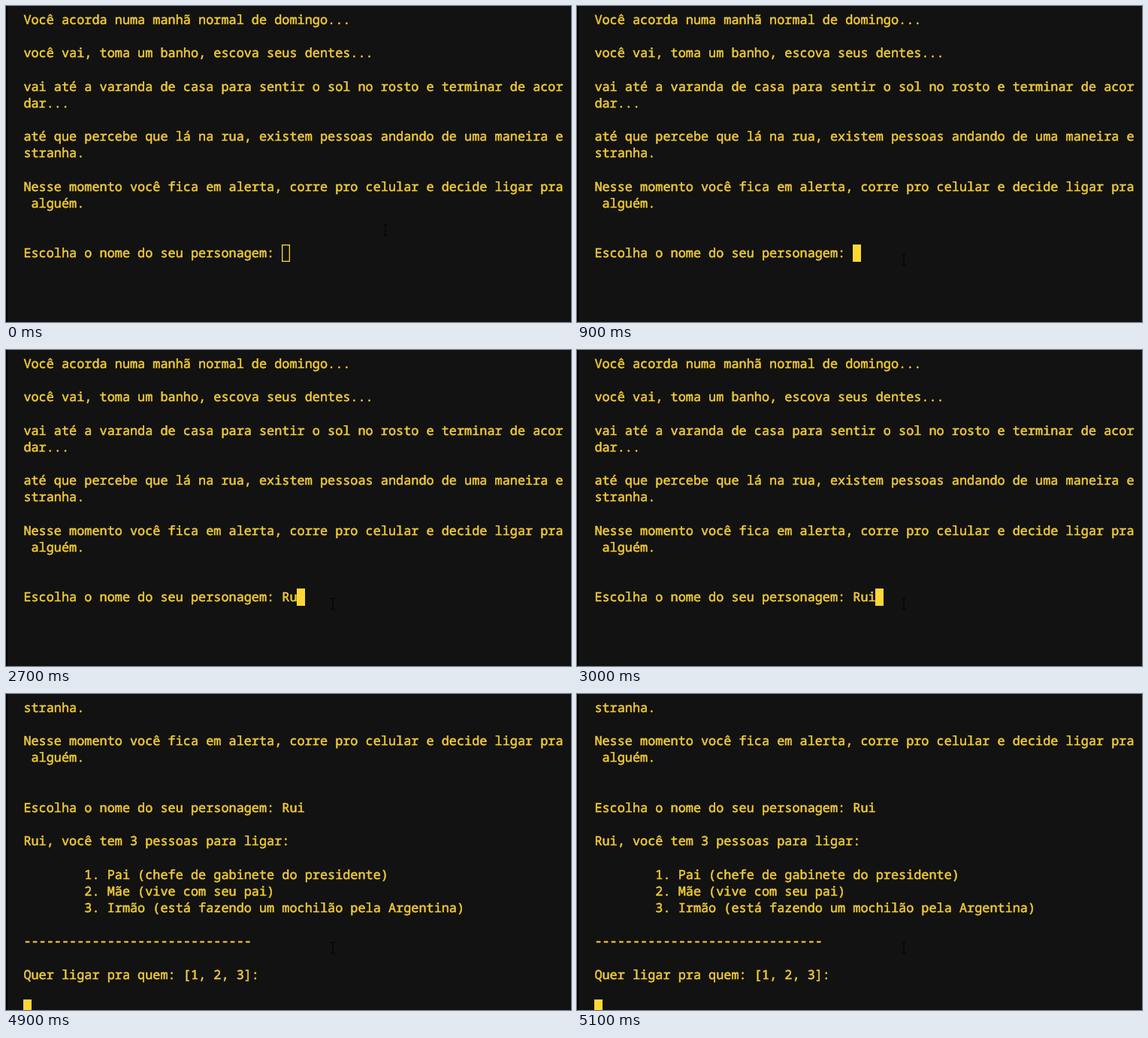
Recreate the animation shown at these times as an HTML page. Size 752 by 420 pixels, loop 8000 ms.

```html
<!DOCTYPE html>
<html lang="pt-BR">
<head>
<meta charset="utf-8">
<title>Terminal</title>
<style>
  html, body { margin: 0; width: 100%; height: 100%; overflow: hidden; background: #121212; }
  svg { display: block; width: 752px; height: 420px; }
  text {
    font: 500 16.87px "Noto Sans Mono", "DejaVu Sans Mono", monospace;
    fill: #efca36;
    stroke: #efca36;
    stroke-width: 0.55px;
    white-space: pre;
    text-rendering: geometricPrecision;
  }
</style>
</head>
<body>
<svg id="stage" viewBox="0 0 752 420">
  <rect width="752" height="420" fill="#121212"/>
  <rect width="2" height="420" fill="#030303"/>
  <g id="lines"></g>
  <rect id="caret" stroke="#fdd835"/>
  <path id="mouse" d="M-3 -7.5H-1L0 -6.5L1 -7.5H3M0 -6.5V6.5M-3 7.5H-1L0 6.5L1 7.5H3" fill="none" stroke="#000"/>
</svg>
<script>
const LOOP = 8000, LEFT = 23.4, BASE = 23.8, COL = 10.12, ROW = 22.18;
const NAME = 'Rui';
const PROMPT = 'Escolha o nome do seu personagem: ';
const $ = id => document.getElementById(id);

const ALERT = [
  'stranha.',
  '',
  'Nesse momento você fica em alerta, corre pro celular e decide ligar pra',
  ' alguém.',
  '', ''
];
const INTRO = [
  'Você acorda numa manhã normal de domingo...',
  '',
  'você vai, toma um banho, escova seus dentes...',
  '',
  'vai até a varanda de casa para sentir o sol no rosto e terminar de acor',
  'dar...',
  '',
  'até que percebe que lá na rua, existem pessoas andando de uma maneira e',
  ...ALERT
];
const MENU = [
  ...ALERT,
  PROMPT + NAME,
  '',
  NAME + ', você tem 3 pessoas para ligar:',
  '',
  '        1. Pai (chefe de gabinete do presidente)',
  '        2. Mãe (vive com seu pai)',
  '        3. Irmão (está fazendo um mochilão pela Argentina)',
  '',
  '-'.repeat(30),
  '',
  'Quer ligar pra quem: [1, 2, 3]:',
  '',
  ''
];

const FOCUS = 800, ENTER = 4900;
const KEYS = [2400, 2600, 2800];
const MOUSE = [[0, 505, 297.5], [400, 480, 312], [500, 445, 331], [600, 435, 337.5]];

const rows = MENU.map((_, i) => {
  const row = document.createElementNS('http://www.w3.org/2000/svg', 'text');
  row.setAttribute('x', LEFT);
  row.setAttribute('y', BASE + i * ROW);
  $('lines').append(row);
  return row;
});

function set(el, attrs) {
  for (const key in attrs) el.setAttribute(key, attrs[key]);
}

function drawCaret(col, row, solid) {
  const inset = solid ? 0 : 0.65;
  set($('caret'), {
    x: Math.round(LEFT - 0.4 + col * COL) + inset,
    y: Math.round(6.7 + row * ROW) + inset,
    width: 11 - 2 * inset,
    height: 23 - 2 * inset,
    fill: solid ? '#fdd835' : 'none',
    'stroke-width': solid ? 0 : 1.3
  });
}

function draw(t) {
  const typed = NAME.slice(0, KEYS.filter(k => t >= k).length);
  const menu = t >= ENTER;
  const screen = menu ? MENU : [...INTRO, PROMPT + typed];
  rows.forEach((row, i) => {
    const line = screen[i] || '';
    if (row.textContent !== line) row.textContent = line;
  });
  if (menu) drawCaret(0, MENU.length - 1, true);
  else drawCaret(PROMPT.length + typed.length, INTRO.length, t >= FOCUS);

  const [, x, y] = MOUSE.filter(step => t >= step[0]).pop();
  set($('mouse'), { transform: `translate(${x} ${y})` });
}

const start = performance.now();
function tick() {
  draw((performance.now() - start) % LOOP);
  requestAnimationFrame(tick);
}
tick();
</script>
</body>
</html>
```
